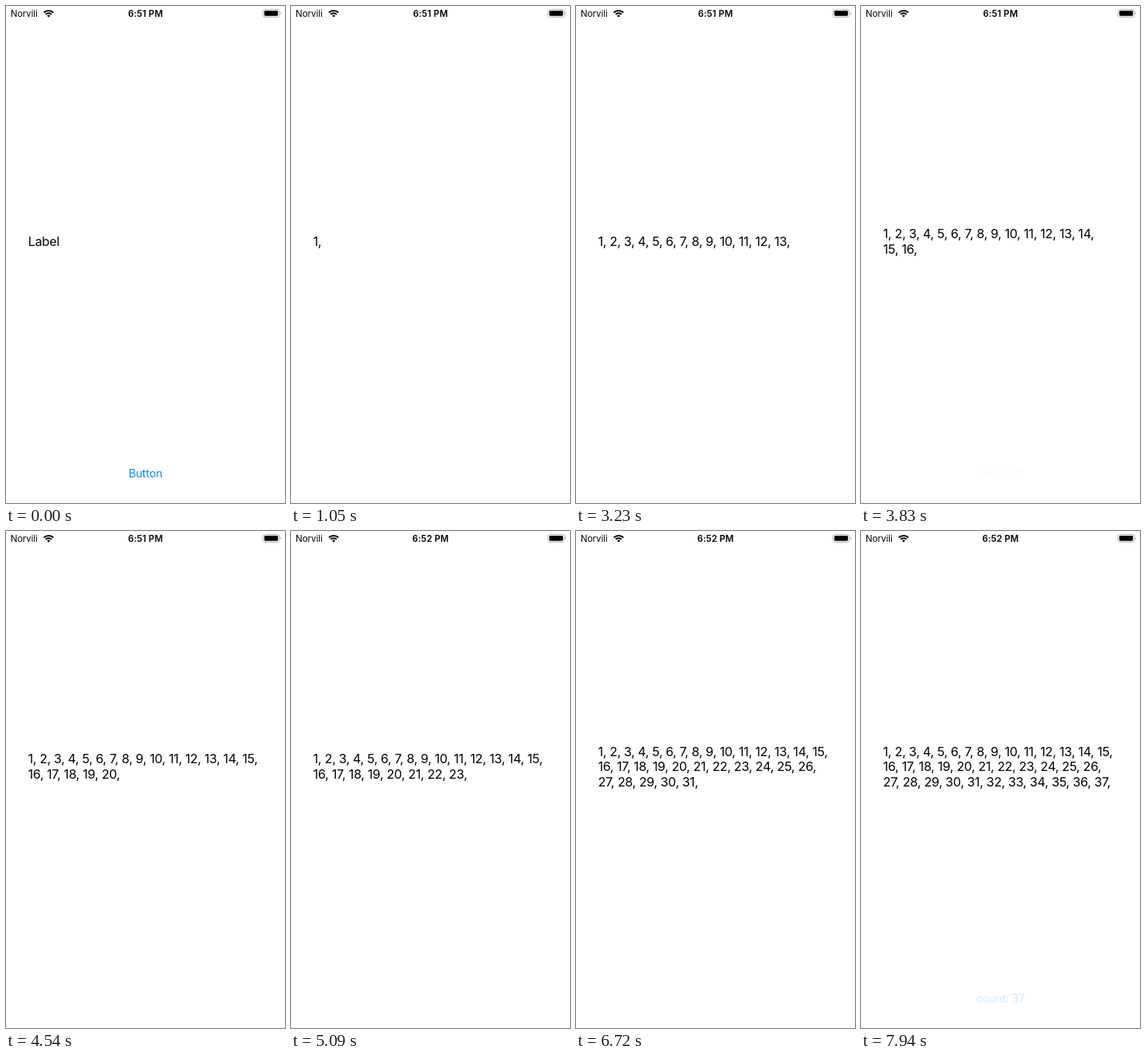
These frames come from a looping animation (360x640 px, 8 s). An HTML page:

```html
<!DOCTYPE html>
<html lang="en">
<head>
<meta charset="utf-8">
<title>Counter</title>
<style>
  html, body {
    margin: 0;
    width: 100%;
    height: 100%;
    overflow: hidden;
    background: #fff;
  }
  #stage {
    position: relative;
    width: 360px;
    height: 640px;
    overflow: hidden;
    color: #000;
    font-family: Inter, Roboto, sans-serif;
  }
  #stage > * { position: absolute; white-space: pre; }
  #network, #clock { top: 3px; font-size: 11.5px; line-height: 15px; }
  #network { left: 6px; }
  #clock {
    left: 0;
    width: 360px;
    text-align: center;
    font-weight: 600;
    letter-spacing: 0.15px;
  }
  #icons { left: 0; top: 0; }
  #label {
    left: 28.5px;
    font-size: 16.32px;
    line-height: 19.5px;
    letter-spacing: -0.31px;
  }
  #button {
    left: 0;
    top: 592px;
    width: 360px;
    text-align: center;
    font-size: 14.4px;
    line-height: 20px;
    letter-spacing: -0.12px;
    color: #1285ea;
  }
</style>
</head>
<body>
<div id="stage">
  <div id="network">Norvili</div>
  <div id="clock"></div>
  <svg id="icons" width="360" height="20">
    <g fill="none" stroke="#000" stroke-width="2">
      <path d="M48.9 8.5a8.6 8.6 0 0 1 12.2 0"/>
      <path d="M51.2 10.8a5.4 5.4 0 0 1 7.6 0"/>
    </g>
    <path d="M55 14.6l-2-2.1a2.9 2.9 0 0 1 4 0z"/>
    <rect x="331.6" y="4.4" width="21" height="10" rx="2.6" fill="none" stroke="#b0b0b0"/>
    <rect x="333.3" y="6.1" width="17.6" height="6.6" rx="1.4"/>
    <path d="M353.7 7.7q1.4.5 1.4 1.7t-1.4 1.7z" fill="#b0b0b0"/>
  </svg>
  <div id="label"></div>
  <div id="button"></div>
</div>
<script>
  const LOOP = 8000, TAP = 500, MINUTE = 4640;
  const START = 690, TICK = 191, LAST = 37;
  // The title glimmers around regular moments, fading out after each tick.
  const BEAT = 2000, GLIMPSE = 440, FADE = 130;

  const $ = id => document.getElementById(id);
  const clock = $("clock"), label = $("label"), button = $("button");

  function setText(el, text) {
    if (el.textContent !== text) el.textContent = text;
  }

  function numbers(count) {
    // A lone number never stands on the second line.
    const breaks = count === 16 ? [14] : [15, 26];
    let text = "";
    for (let n = 1; n <= count; n++) {
      text += n + ",";
      if (n < count) text += breaks.includes(n) ? "\n" : " ";
    }
    return text;
  }

  function drawLabel(count) {
    const text = count ? numbers(count) : "Label";
    const lines = text.split("\n").length;
    setText(label, text);
    label.style.top = 303.75 - lines * 9.75 + "px";
  }

  function drawButton(t, count) {
    let shown = count, alpha;
    if (!count) {
      alpha = t < TAP ? 1 : 0.2 + (t - TAP) / 500;
    } else {
      const age = t - START - count * TICK;
      const fromBeat = Math.abs((t + BEAT / 10 + BEAT / 2) % BEAT - BEAT / 2);
      const leaving = age < FADE;
      if (leaving) shown--;
      alpha = leaving ? 0.13 * (1 - age / FADE) : 0.18;
      if (fromBeat > GLIMPSE) alpha = 0;
    }
    setText(button, shown ? "count: " + shown : "Button");
    button.style.opacity = alpha;
  }

  function draw() {
    const t = performance.now() % LOOP;
    const ticks = Math.floor((t - START) / TICK);
    const count = Math.max(0, Math.min(LAST, ticks));
    setText(clock, t < MINUTE ? "6:51 PM" : "6:52 PM");
    drawLabel(count);
    drawButton(t, count);
    requestAnimationFrame(draw);
  }
  draw();
</script>
</body>
</html>
```
